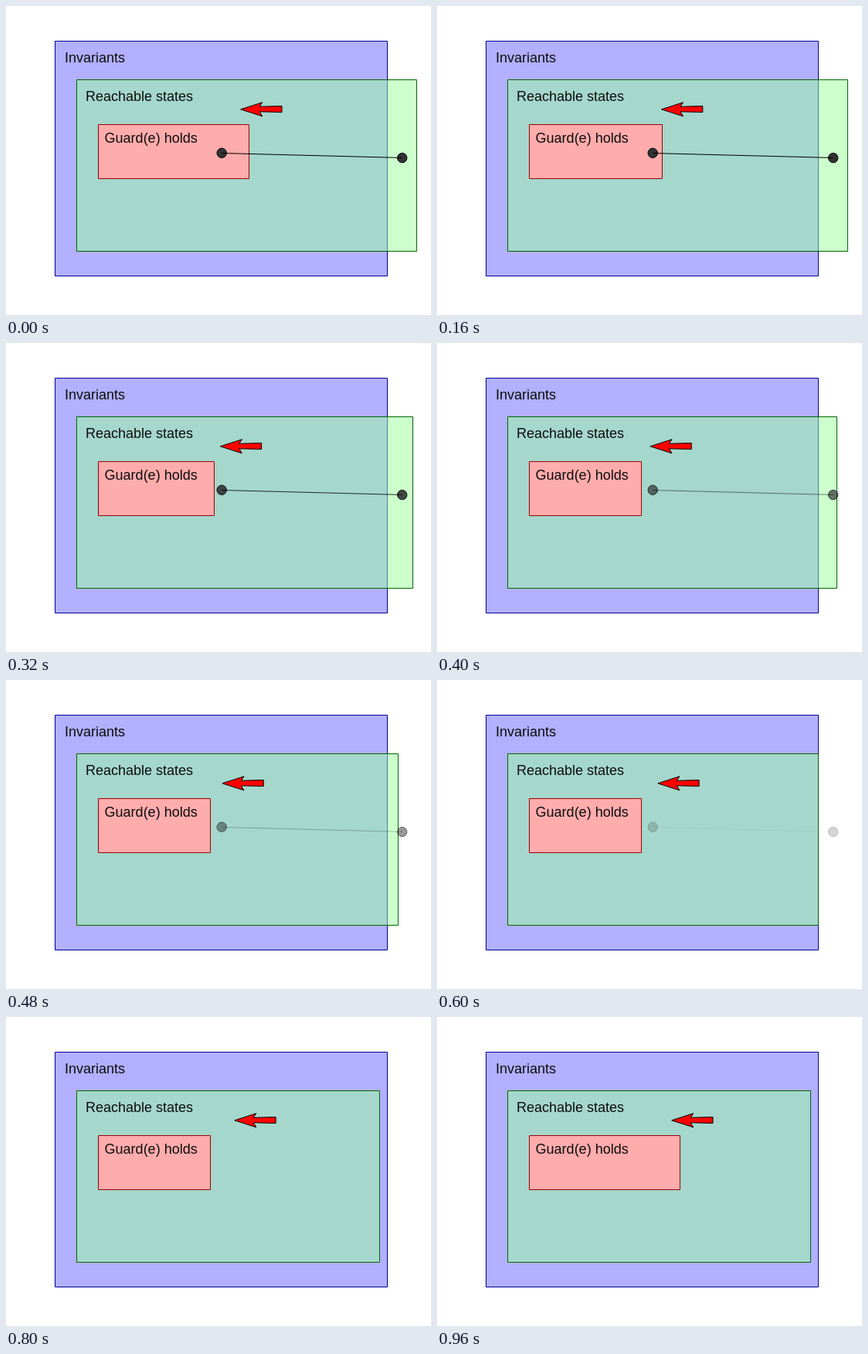
These frames come from a looping animation (550x400 px, 1 s). An HTML page with a canvas:

```html
<!DOCTYPE html>
<html lang="en">
<head>
<meta charset="utf-8">
<title>Guard strengthening</title>
<style>
  html, body { margin: 0; width: 100%; height: 100%; overflow: hidden; background: #fff; }
  canvas { display: block; }
</style>
</head>
<body>
<canvas id="stage" width="550" height="400"></canvas>
<script>
const ctx = document.getElementById('stage').getContext('2d');
const STEP = 40, STEPS = 25;
const clamp = (v, lo, hi) => Math.min(hi, Math.max(lo, v));

// Box given by its edges, outlined on pixel centres
function box(left, top, right, bottom, fill, line) {
  ctx.beginPath();
  ctx.rect(left + .5, top + .5, right - left, bottom - top);
  ctx.fillStyle = fill;
  ctx.fill();
  ctx.strokeStyle = line;
  ctx.stroke();
}

function label(text, x, y) {
  ctx.fillStyle = '#0c0c0c';
  ctx.fillText(text, x, y);
}

function dot(x, y) {
  ctx.beginPath();
  ctx.arc(x, y, 6.2, 0, Math.PI * 2);
  ctx.fillStyle = '#333336';
  ctx.fill();
  ctx.strokeStyle = '#000';
  ctx.stroke();
}

function transition(alpha) {
  ctx.save();
  ctx.globalAlpha = alpha;
  dot(279.2, 190.3);
  dot(512.7, 196.6);
  // The thin line fades faster than the dots
  ctx.globalAlpha = alpha * alpha;
  ctx.beginPath();
  ctx.moveTo(279, 190.5);
  ctx.lineTo(512.5, 196.5);
  ctx.stroke();
  ctx.restore();
}

function arrow(tip) {
  const shape = [[0, 0], [28, -9], [24.5, -3.5], [53.3, -4.3], [53.3, 3.7], [24.5, 3], [28, 9]];
  ctx.beginPath();
  for (const [x, y] of shape) ctx.lineTo(tip + x, 133.8 + y);
  ctx.closePath();
  ctx.fillStyle = '#f00';
  ctx.fill();
  ctx.strokeStyle = '#000';
  ctx.stroke();
}

function draw(k) {
  const guardRight = k === STEPS - 1 ? 314 : Math.floor(314 - 50 * Math.min(k, 9) / 9);
  const fade = clamp((k - 7) / 10, 0, 1);
  const reachRight = Math.round(531 - 48 * fade);
  const tip = k < 9 ? 303.7 - 3.3 * k : 274 + 1.98 * (k - 9);

  ctx.fillStyle = '#fff';
  ctx.fillRect(0, 0, 550, 400);
  ctx.lineWidth = 1;
  ctx.font = '18px "Liberation Sans", Arial, sans-serif';

  box(63, 45, 493, 349, '#b2b0ff', '#000099');
  label('Invariants', 76, 73);
  box(91, 95, reachRight, 317, 'rgba(153,255,153,.5)', '#006600');
  label('Reachable states', 103, 123);
  box(119, 153, guardRight, 223, '#ffacac', '#990000');
  label('Guard(e) holds', 127.6, 177);
  if (fade < 1) transition(1 - fade);
  arrow(tip);
}

function tick() {
  draw(Math.floor(performance.now() / STEP) % STEPS);
  requestAnimationFrame(tick);
}
tick();
</script>
</body>
</html>
```
